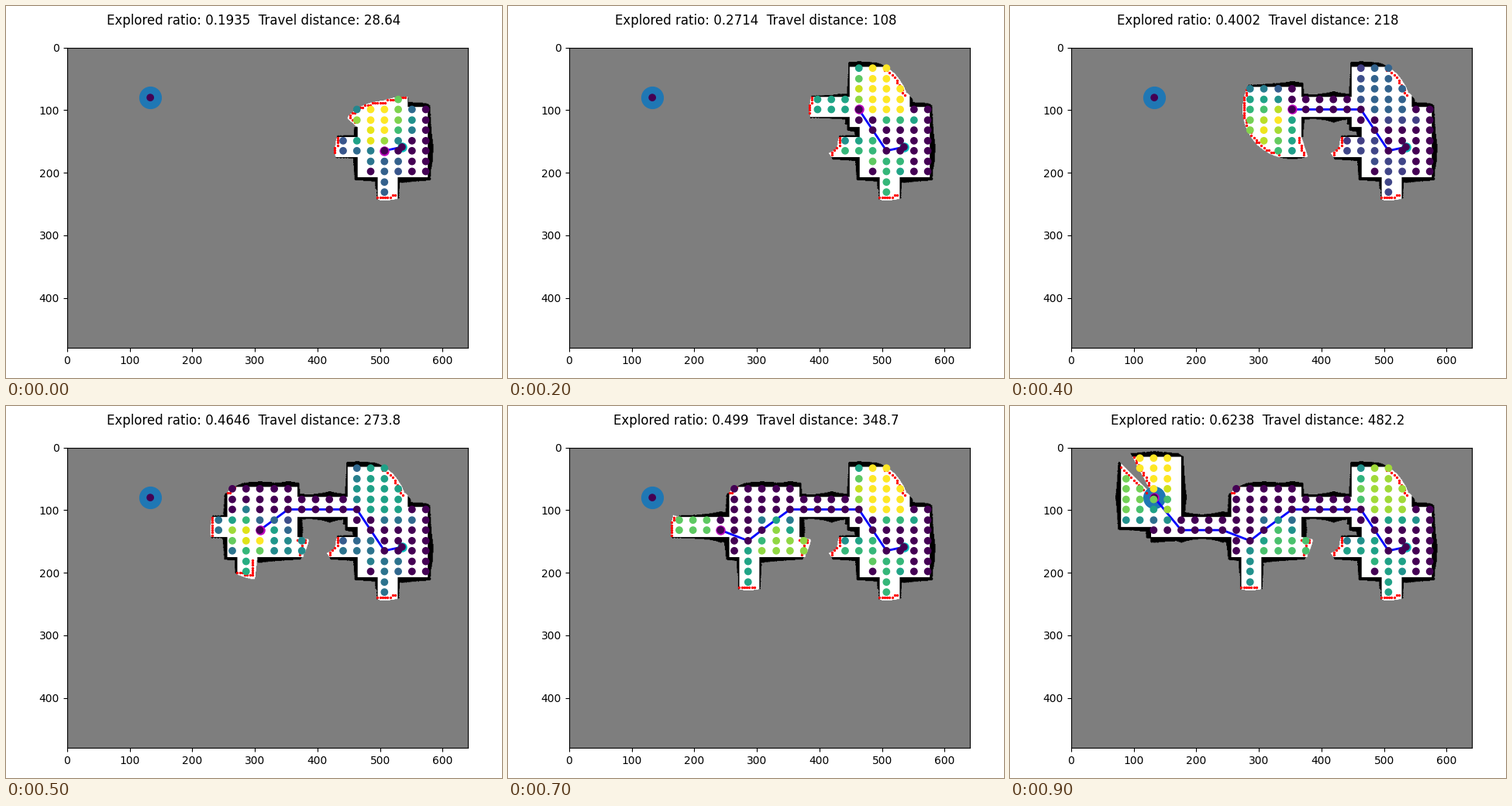
Recreate the animation shown at these times as a matplotlib script. Size 640 by 480 pixels, loop 1000 ms.

```python
import math

import matplotlib.pyplot as plt
import numpy as np
from matplotlib.animation import FuncAnimation

W, H = 640, 480
WALL, UNKNOWN, FREE = 1, 127, 255
SENSOR_RANGE, UTILITY_RANGE = 80, 70
MIN_UTILITY = 4
WALL_DEPTH = 10  # steps a ray may go into a wall
TILE = 16
START, GOAL = (535, 159), (133, 80)

# Floor plan in tiles: left, top, width, height
ROOMS = [(29, 6, 7, 7), (28, 2, 6, 6), (16, 4, 7, 7), (5, 1, 6, 7)]
CORRIDORS = [(23, 5, 5, 2), (23, 9, 6, 2), (8, 7, 8, 2),
             (31, 13, 2, 6), (17, 11, 2, 6)]

# Candidate viewpoints form a regular grid; the route visits some of them
XS = np.linspace(0, W - 1, 30).round().astype(int)
YS = np.linspace(0, H - 1, 30).round().astype(int)
STOPS = [(23, 10), (22, 8), (21, 6), (19, 6), (16, 6),
         (14, 8), (13, 9), (11, 8), (8, 8)]
ROUTE = [START] + [(int(XS[i]), int(YS[j])) for i, j in STOPS] + [GOAL]
RATIOS = [0.1935, 0.2398, 0.2714, 0.2982, 0.4002,
          0.4646, 0.481, 0.499, 0.5567, 0.6238]


def build_world():
    world = np.full((H, W), WALL)
    for left, top, width, height in np.array(ROOMS + CORRIDORS) * TILE:
        world[top:top + height, left:left + width] = FREE
    # A small obstacle beside the goal casts a narrow shadow
    world[GOAL[1] - 6, GOAL[0] - 5:GOAL[0] - 3] = WALL
    return world


def walk(x, y, x1, y1):
    """Yield the grid cells on a line, one axis step at a time."""
    dx, dy = abs(x1 - x), abs(y1 - y)
    step_x = 1 if x1 > x else -1
    step_y = 1 if y1 > y else -1
    error = dx - dy
    while (x, y) != (x1, y1) and 0 <= x < W and 0 <= y < H:
        yield x, y
        if error > 0:
            x += step_x
            error -= 2 * dy
        else:
            y += step_y
            error += 2 * dx


def sense(belief, world, position):
    x0, y0 = position
    for k in range(720):
        angle = math.radians(k / 2)
        x1 = round(x0 + SENSOR_RANGE * math.cos(angle))
        y1 = round(y0 + SENSOR_RANGE * math.sin(angle))
        hits = 0
        for x, y in walk(x0, y0, x1, y1):
            value = world[y, x]
            if value == WALL:
                hits += 1
                if hits >= WALL_DEPTH:
                    break
            elif hits:
                break
            belief[y, x] = value


def find_frontiers(belief):
    coarse = belief.reshape(H // 4, 4, W // 4, 4).min(axis=(1, 3))
    unknown = np.pad((coarse == UNKNOWN).astype(int), 1)
    rows, cols = coarse.shape
    around = sum(unknown[j:j + rows, i:i + cols]
                 for j in range(3) for i in range(3) if (i, j) != (1, 1))
    ys, xs = np.nonzero((coarse == FREE) & (around > 1) & (around < 8))
    return np.column_stack([xs, ys]) * 4


def utility(belief, node, frontiers):
    """Count the frontier points in clear view of a node."""
    distance = np.hypot(*(frontiers - node).T)
    seen = sum(
        all(belief[y, x] == FREE for x, y in walk(*node, int(fx), int(fy)))
        for fx, fy in frontiers[distance < UTILITY_RANGE])
    return seen if seen > MIN_UTILITY else 0


def explore():
    world = build_world()
    belief = np.full((H, W), UNKNOWN)
    sense(belief, world, START)
    travelled, states = 0, []
    for step, ratio in enumerate(RATIOS, 1):
        travelled += math.dist(ROUTE[step - 1], ROUTE[step])
        sense(belief, world, ROUTE[step])
        frontiers = find_frontiers(belief)
        nodes = [START, GOAL] + [(int(x), int(y)) for y in YS for x in XS
                                 if belief[y, x] == FREE]
        visited = {*ROUTE[:step + 1], GOAL}
        values = [0 if n in visited else utility(belief, n, frontiers)
                  for n in nodes]
        title = (f"Explored ratio: {ratio:.4g}  "
                 f"Travel distance: {travelled:.4g}")
        states.append((belief.copy(), frontiers, nodes, values,
                       ROUTE[:step + 1], title))
    return states


STATES = explore()

fig, ax = plt.subplots(figsize=(6.4, 4.8), dpi=100)
image = ax.imshow(STATES[0][0], cmap="gray", vmin=WALL, vmax=FREE)
ax.scatter(*GOAL, s=400, color="tab:blue", zorder=1)
path, = ax.plot([], [], "b", linewidth=2)
robot, = ax.plot([], [], "mo", markersize=8)
ax.plot(*START, "co", markersize=8)
frontier_dots = ax.scatter([], [], c="r", s=2, zorder=3)
node_dots = ax.scatter([0], [0], c=[0], cmap="viridis", zorder=5)
ax.axis((0, W, H, 0))
heading = fig.suptitle(STATES[0][-1])
fig.tight_layout()


def update(frame):
    belief, frontiers, nodes, values, route, title = STATES[frame]
    image.set_data(belief)
    frontier_dots.set_offsets(frontiers)
    node_dots.set_offsets(nodes)
    node_dots.set_array(np.array(values))
    node_dots.set_clim(0, max(values))
    path.set_data(*zip(*route))
    robot.set_data(*zip(route[-1]))
    heading.set_text(title)
    return image, path, robot, frontier_dots, node_dots, heading


animation = FuncAnimation(fig, update, frames=len(STATES), interval=100,
                          repeat=True)
plt.show()
```
